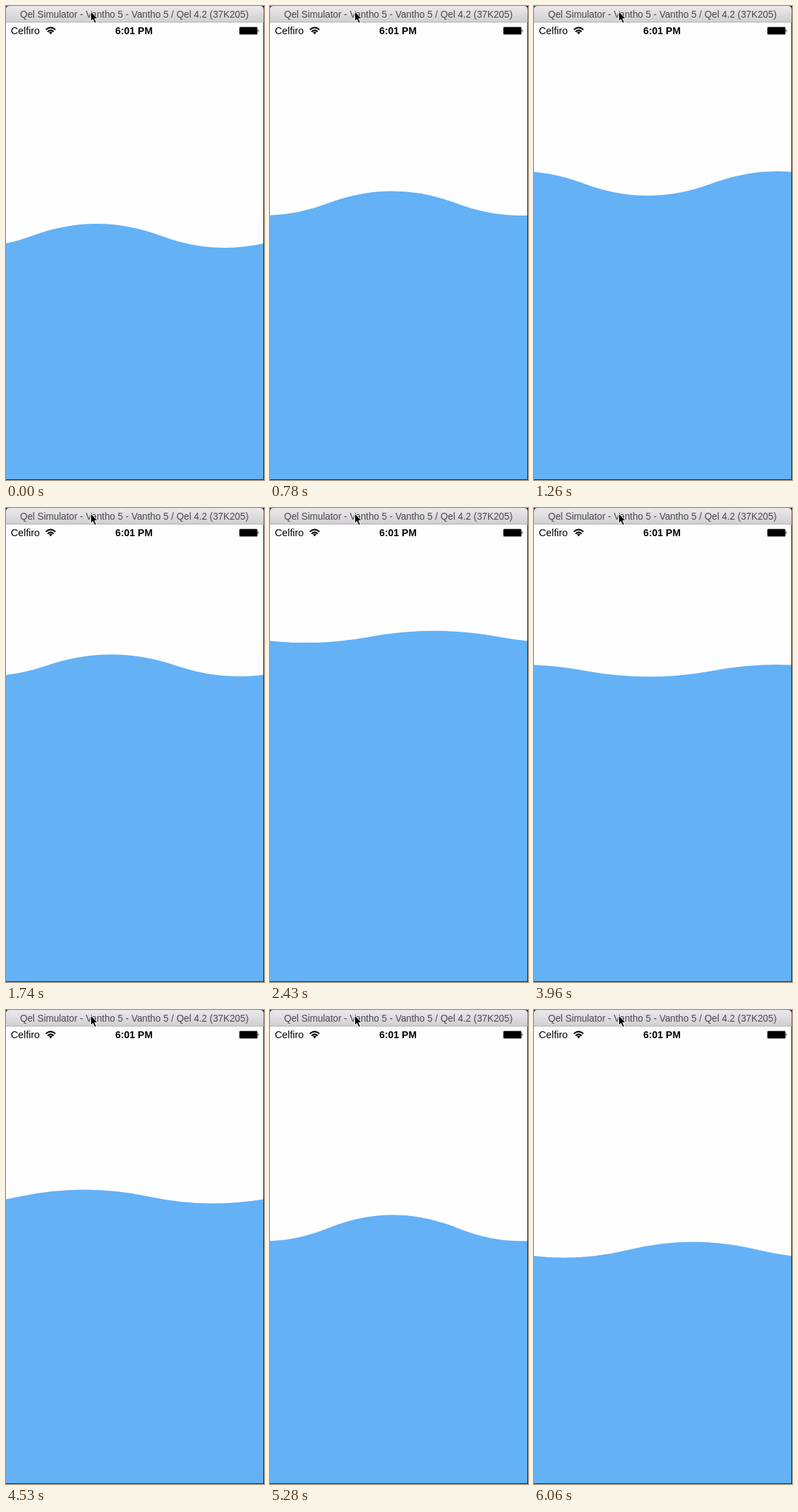
An HTML page for the animation above (6.09 s loop, 376 px wide and 690 px high).

```html
<!DOCTYPE html>
<html lang="en">
<head>
<meta charset="utf-8">
<title>Water wave</title>
<style>
  html, body { margin: 0; width: 100%; height: 100%; overflow: hidden; background: #20242a; }
  svg { display: block; width: 376px; height: 690px; }
  text { font-family: "Liberation Sans", Arial, sans-serif; text-anchor: middle; }
</style>
</head>
<body>
<svg viewBox="0 0 376 690">
  <defs>
    <linearGradient id="bar" x2="0" y2="1">
      <stop offset="0" stop-color="#ebe9eb"/>
      <stop offset="1" stop-color="#d0ced0"/>
    </linearGradient>
    <clipPath id="screen"><path d="M0 24H375V689H2Q0 689 0 687Z"/></clipPath>
  </defs>

  <path d="M0 24V5Q0 0 5 0H370Q375.500 0 375.500 5V24Z" fill="url(#bar)"/>
  <path d="M0 23.500H375.500" stroke="#b4b2b4"/>
  <text x="187" y="17" font-size="13.800" fill="#4b494b">Qel Simulator - Vantho 5 - Vantho 5 / Qel 4.2 (37K205)</text>

  <g clip-path="url(#screen)">
    <rect y="24" width="375" height="665" fill="#fefefe"/>
    <path id="water" fill="#64b1f6"/>
  </g>

  <text x="7" y="41" font-size="14.600" style="text-anchor:start">Celfiro</text>
  <text x="186.500" y="41" font-size="14.400" font-weight="bold">6:01 PM</text>
  <g fill="none" stroke="#000" stroke-width="2">
    <path d="M58 34.600Q65 28.200 72 34.600M60.600 37.400Q65 33.300 69.400 37.400"/>
    <path d="M62.400 38.600Q65 36.400 67.600 38.600L65 41.300Z" fill="#000" stroke="none"/>
  </g>
  <rect x="340" y="30.500" width="26.500" height="11" rx="1.500" fill="#000" stroke="#999" stroke-width=".6"/>
  <path d="M367.300 34Q369.300 36 367.300 38Z"/>

  <path d="M123.500 8V22.200L126.700 19.300L129 24.800L131.600 23.700L129.300 18.300H133.600Z"
        fill="#000" stroke="#fff" stroke-width="1"/>
</svg>
<script>
  const LOOP = 6090, STEP = 30, WAVE = 375, QUARTER = WAVE / 4;

  // [seconds, value] pairs, joined by straight lines
  const level = [[0, 334.5], [2.79, 165.6], [5.93, 356.8], [6.06, 349]];
  const height = [[0, 17.5], [1.26, 17.8], [1.74, 16], [1.89, 15], [2.43, 8.7],
    [3.39, 8.5], [4.41, 9], [4.53, 10], [5.04, 21], [5.67, 16], [6.06, 11.5]];
  const crest = [[0, 132], [0.78, -197], [1.74, -596.5], [2.43, -885.5],
    [3.39, -1279.5], [4.53, -1761], [6.06, -2393]];

  const water = document.getElementById("water");

  function at(points, t) {
    let i = 1;
    while (i < points.length - 1 && t > points[i][0]) i++;
    const [t0, v0] = points[i - 1], [t1, v1] = points[i];
    return v0 + (v1 - v0) * (t - t0) / (t1 - t0);
  }

  function surface(t) {
    const y = at(level, t), h = at(height, t);
    const shift = ((at(crest, t) - QUARTER) % WAVE + WAVE) % WAVE;
    const arc = dy => `q${QUARTER} ${dy} ${2 * QUARTER} 0`;
    const wave = arc(-2 * h) + arc(2 * h);
    return `M${shift - WAVE} ${y}${wave}${wave}V700H-400Z`;
  }

  const start = performance.now();
  function draw() {
    const ms = (performance.now() - start) % LOOP;
    water.setAttribute("d", surface(Math.floor(ms / STEP) * STEP / 1000));
    requestAnimationFrame(draw);
  }
  draw();
</script>
</body>
</html>
```
